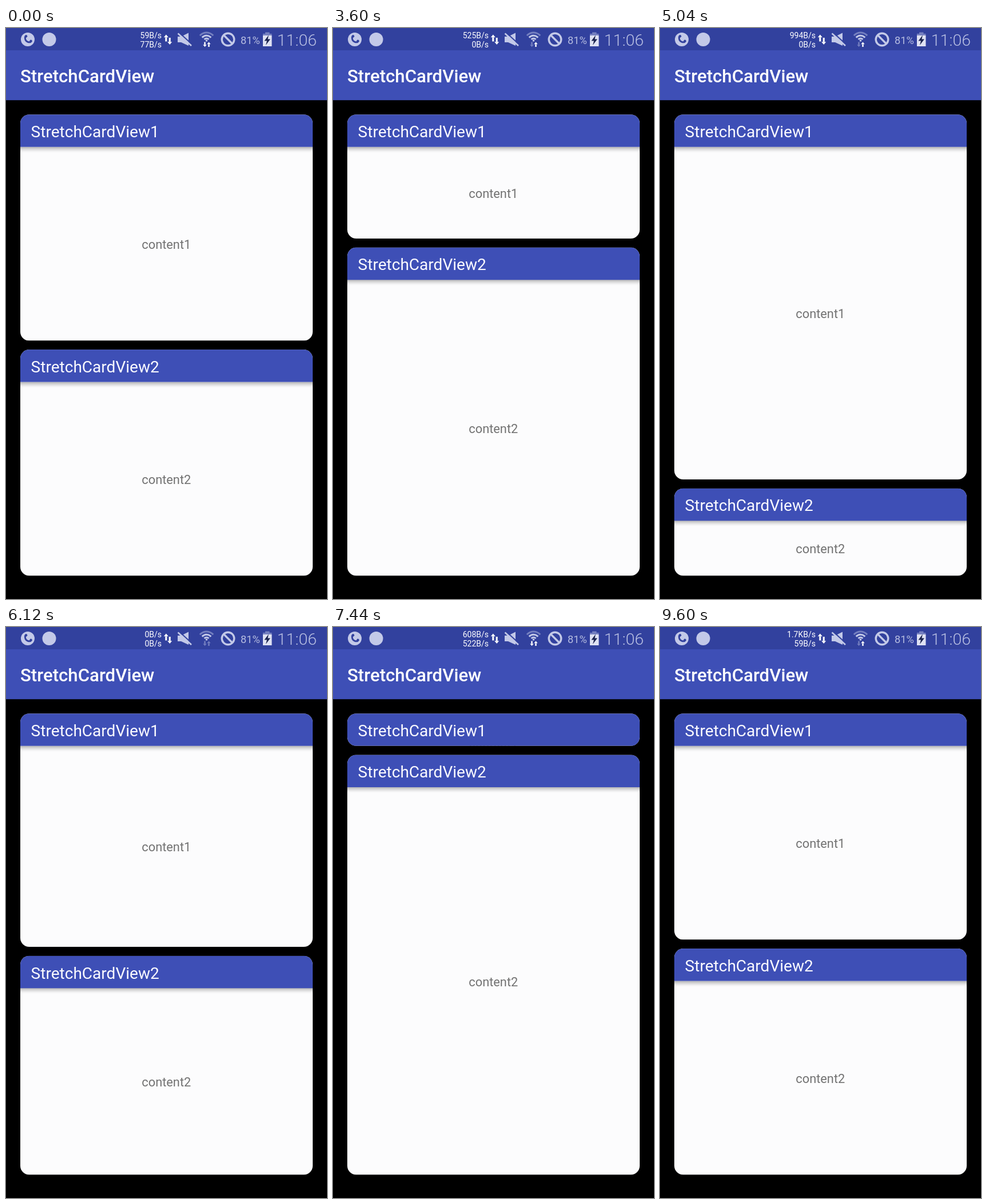
These frames come from a looping animation (561 px wide and 998 px high, 9.76 s). An HTML page with a canvas:

```html
<!DOCTYPE html>
<html lang="en">
<head>
<meta charset="utf-8">
<title>StretchCardView</title>
<style>
  html, body { margin: 0; width: 100%; height: 100%; overflow: hidden; background: #000; }
  canvas { display: block; width: 100vw; height: 100vh; }
</style>
</head>
<body>
<canvas id="stage" width="561" height="998"></canvas>
<script>
const ctx = document.getElementById('stage').getContext('2d');
const LOOP = 9760, STEP = 40, MOVE = 330;
const BLUE = '#3e4fb6', BAR = '#32419e', ICON = '#c3c9e8', DIM = '#7580c0', WHITE = '#fff';

// Layout in pixels
const LEFT = 25, WIDTH = 511, TOP = 151.2, BOTTOM = 957.4;
const HEAD = 56.6, GAP = 15.6, RADIUS = 15.6;
const SPACE = BOTTOM - TOP - 2 * HEAD - GAP;

// Each move animates the weight of one card: [start, card, target]
const moves = [
  [2393, 0, 0], [3476, 0, 1],
  [4798, 1, 0], [5847, 1, 1],
  [6855, 0, 0], [8190, 0, 1]
];

// Network speed: [time, up, down]
const speeds = [
  [0, '59B/s', '77B/s'], [440, '0B/s', '0B/s'], [1440, '118B/s', '59B/s'],
  [2440, '624B/s', '0B/s'], [3440, '525B/s', '0B/s'], [4440, '994B/s', '0B/s'],
  [5440, '0B/s', '0B/s'], [6440, '312B/s', '0B/s'], [7440, '608B/s', '522B/s'],
  [8440, '140B/s', '0B/s'], [9440, '1.7KB/s', '59B/s']
];

// Lit wifi arrows: [time, down, up]
const traffic = [[0, 1, 1], [3240, 0, 1], [5600, 0, 0], [6600, 1, 1], [9600, 0, 1]];

const ease = u => 0.5 - Math.cos(Math.PI * Math.min(1, Math.max(0, u))) / 2;
const current = (list, t) => list.filter(e => e[0] <= t).pop();

function weight(card, t) {
  let w = 1;
  for (const [start, id, target] of moves) {
    if (id === card) w += (target - w) * ease((t - start) / MOVE);
  }
  return w;
}

function text(str, x, y, size, color, align = 'left', weight = 400) {
  ctx.font = `${weight} ${size}px Roboto, sans-serif`;
  ctx.textAlign = align;
  ctx.fillStyle = color;
  ctx.fillText(str, x, y);
}

function rect(x, y, w, h, color) {
  ctx.fillStyle = color;
  ctx.fillRect(x, y, w, h);
}

function disc(x, y, r, color) {
  ctx.fillStyle = color;
  ctx.beginPath();
  ctx.arc(x, y, r, 0, 7);
  ctx.fill();
}

function poly(points, color) {
  ctx.fillStyle = color;
  ctx.fill(new Path2D(`M${points.join('L')}Z`));
}

// Straight bar between two points
function bar(x1, y1, x2, y2, width, color) {
  ctx.save();
  ctx.translate(x1, y1);
  ctx.rotate(Math.atan2(y2 - y1, x2 - x1));
  rect(0, -width / 2, Math.hypot(x2 - x1, y2 - y1), width, color);
  ctx.restore();
}

// Part of a ring, centred on radius r
function ring(x, y, r, from, to, width, color) {
  ctx.fillStyle = color;
  ctx.beginPath();
  ctx.arc(x, y, r + width / 2, from, to);
  ctx.arc(x, y, r - width / 2, to, from, true);
  ctx.fill();
}

// Vertical arrow; dir is -1 for up, 1 for down
function arrow(x, tip, len, half, stem, dir, color) {
  const neck = tip - dir * half * 1.2;
  poly([[x, tip], [x - half, neck], [x + half, neck]], color);
  const tail = tip - dir * len;
  rect(x - stem / 2, Math.min(neck, tail), stem, Math.abs(tail - neck), color);
}

function phone() {
  disc(38, 20, 12, ICON);
  ctx.save();
  ctx.translate(38, 20);
  ctx.rotate(Math.PI / 4);
  ring(0, -3.5, 7.2, 0.35, Math.PI - 0.35, 3, BAR);
  disc(-6, -1.8, 2.3, BAR);
  disc(6, -1.8, 2.3, BAR);
  ctx.restore();
}

function mute() {
  poly([[300, 15], [306, 15], [319, 8.5], [319, 31], [306, 25], [300, 25]], ICON);
  bar(302, 7.5, 326, 29.5, 2.2, BAR);
  bar(300.5, 9.5, 324, 31, 2.6, ICON);
}

function wifi(t) {
  const [, down, up] = current(traffic, t);
  [15.5, 10.3, 5.2].forEach((r, i) =>
    ring(350.5, 23.5, r, -Math.PI * 0.77, -Math.PI * 0.23, 3, i ? ICON : DIM));
  disc(350.5, 22, 1.8, ICON);
  arrow(347.5, 33, 8.5, 3.2, 2.4, 1, down ? WHITE : DIM);
  arrow(354.5, 24.5, 8.5, 3.2, 2.4, -1, up ? WHITE : DIM);
}

function battery() {
  rect(453, 7.5, 7.5, 3, DIM);
  rect(449, 10, 15.5, 3.5, DIM);
  rect(449, 13, 15.5, 19, '#dfe2f3');
  poly([[459, 12.5], [451.5, 22.5], [456, 22.5], [454, 30], [462, 19.5], [457.5, 19.5]], '#1c2450');
}

function statusBar(t) {
  rect(0, 0, 561, 39, BAR);
  phone();
  disc(75.5, 20, 12, ICON);
  const [, up, down] = current(speeds, t);
  text(up, 272, 17.5, 14, WHITE, 'right');
  text(down, 272, 34, 14, WHITE, 'right');
  arrow(279.8, 11.5, 12, 4, 3, -1, WHITE);
  arrow(286.2, 29, 12, 4, 3, 1, WHITE);
  mute();
  wifi(t);
  ring(388, 20, 10.8, 0, Math.PI * 2, 3.4, ICON);
  bar(380.5, 12.5, 395.5, 27.5, 3.4, ICON);
  text('81%', 410, 27.5, 18.3, '#b5bce0');
  battery();
  text('11:06', 543, 31, 28.5, '#b9c0e3', 'right', 300);
}

function card(n, y, body) {
  const edge = y + HEAD;
  ctx.save();
  ctx.beginPath();
  ctx.roundRect(LEFT, y, WIDTH, HEAD + body, RADIUS);
  ctx.clip();
  rect(LEFT, y, WIDTH, HEAD + body, '#fcfcfd');
  text('content' + n, 280.3, edge + body / 2 + 8.8, 21.8, '#727272', 'center');
  // Soft shadow below the header
  for (let i = 0; i < 10; i++) {
    rect(LEFT, Math.round(edge) + i, WIDTH, 1, `rgba(0,0,0,${0.27 * (1 - i / 10) ** 1.6})`);
  }
  rect(LEFT, y, WIDTH, HEAD, BLUE);
  text('StretchCardView' + n, 43.6, y + 39.8, 28.05, '#fafaff');
  ctx.restore();
}

function draw(t) {
  rect(0, 0, 561, 998, '#000');
  rect(0, 39, 561, 87.2, BLUE);
  text('StretchCardView', 25, 94.7, 31.2, WHITE, 'left', 500);
  statusBar(t);
  const a = weight(0, t), b = weight(1, t);
  const body = SPACE * a / (a + b);
  card(1, TOP, body);
  card(2, TOP + HEAD + body + GAP, SPACE - body);
}

const origin = performance.now();
function tick() {
  const t = (performance.now() - origin) % LOOP;
  draw(Math.floor(t / STEP) * STEP);
  requestAnimationFrame(tick);
}
tick();
</script>
</body>
</html>
```
